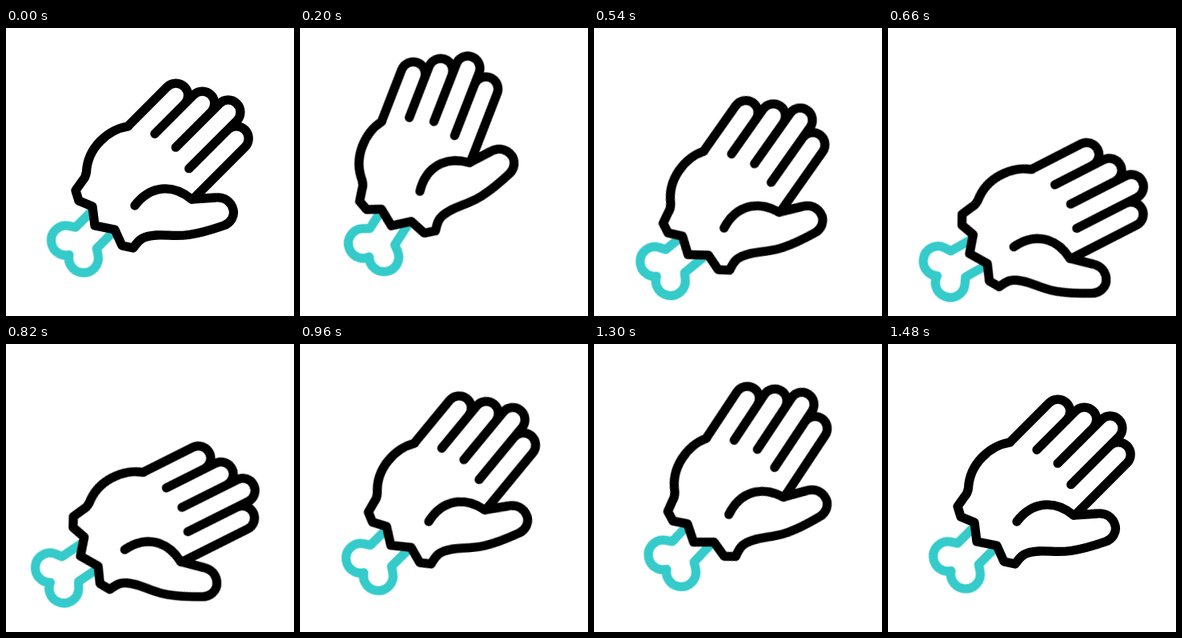
An HTML page for the animation above (2400 ms loop, 360x360 px).

```html
<!DOCTYPE html>
<html lang="en">
<head>
<meta charset="utf-8">
<title>Waving hand</title>
<style>
  html, body { margin: 0; width: 100%; height: 100%; overflow: hidden; background: #fff; }
  svg { display: block; width: 100vw; height: 100vh; }
  path { fill: none; stroke: #000; stroke-width: 11.3; stroke-linecap: round; stroke-linejoin: round; }
  .bone { stroke: #35cbcb; stroke-linecap: butt; }
  .palm { fill: #fff; }

  /* The arm drifts and turns; the wrist follows a little later */
  .drift, .lift, .turn, .wrist {
    transform-origin: 0 0;
    animation: 2400ms cubic-bezier(.37, 0, .63, 1) infinite;
  }
  .drift { animation-name: drift; }
  .lift { animation-name: lift; }
  .turn { animation-name: turn; }
  .wrist { animation-name: wrist; }

  @keyframes drift {
    0%, 61.7%, 100% { transform: translateX(0); }
    8.3% { transform: translateX(-4px); }
    19.2% { transform: translateX(6.5px); }
    34.2% { transform: translateX(-15px); }
    46.7% { transform: translateX(21px); }
  }
  @keyframes lift {
    0%, 61.7%, 100% { transform: translateY(0); }
    12.5% { transform: translateY(-10.5px); }
    26.7% { transform: translateY(43px); }
    45.8% { transform: translateY(-8px); }
  }
  @keyframes turn {
    0%, 61.7%, 100% { transform: rotate(0deg); }
    12.5% { transform: rotate(-16deg); }
    28.8% { transform: rotate(16deg); }
    45% { transform: rotate(-4deg); }
  }
  @keyframes wrist {
    0%, 61.7%, 100% { transform: rotate(0deg); }
    17.5% { transform: rotate(-25deg); }
    31.7% { transform: rotate(9deg); }
    47.5% { transform: rotate(-18deg); }
  }
</style>
</head>
<body>
<svg viewBox="0 0 360 360">
  <g transform="translate(134 234)">
    <g class="drift"><g class="lift"><g class="turn">
      <path class="bone" transform="translate(-48 42.5) rotate(45)" d="M-18.7 -57V-20L-26 -15.2A18.5 18.5 0 1 0 0 10.1A18.5 18.5 0 1 0 26 -15.2L18.7 -20V-57"/>
      <g class="wrist"><g transform="translate(-134 -234)">
        <path class="palm" d="M152.5 123C127 127 102 150 100.500 180Q99.500 187 95.500 191L87 203L91 216L108 223L111 247L136 252L145 272L159 275C166 265 170 260 188 259C212 258 220 265 272 247C281 244 286 235 284 227C281 216 272 211 262 212L232 214"/>
        <path d="M232 214C208 194 180 197 161 222"/>
        <path transform="rotate(45)" d="M194.500 -21V-90.5A15.2 15.2 0 0 1 225 -90.5M225 -38V-106.8A15.2 15.2 0 0 1 255.5 -106.8M255.5 -44.5V-122A15.2 15.2 0 0 1 286 -122V-37.5M286 -106A15.2 15.2 0 0 1 316.500 -106V-15"/>
      </g></g>
    </g></g></g>
  </g>
</svg>
</body>
</html>
```
